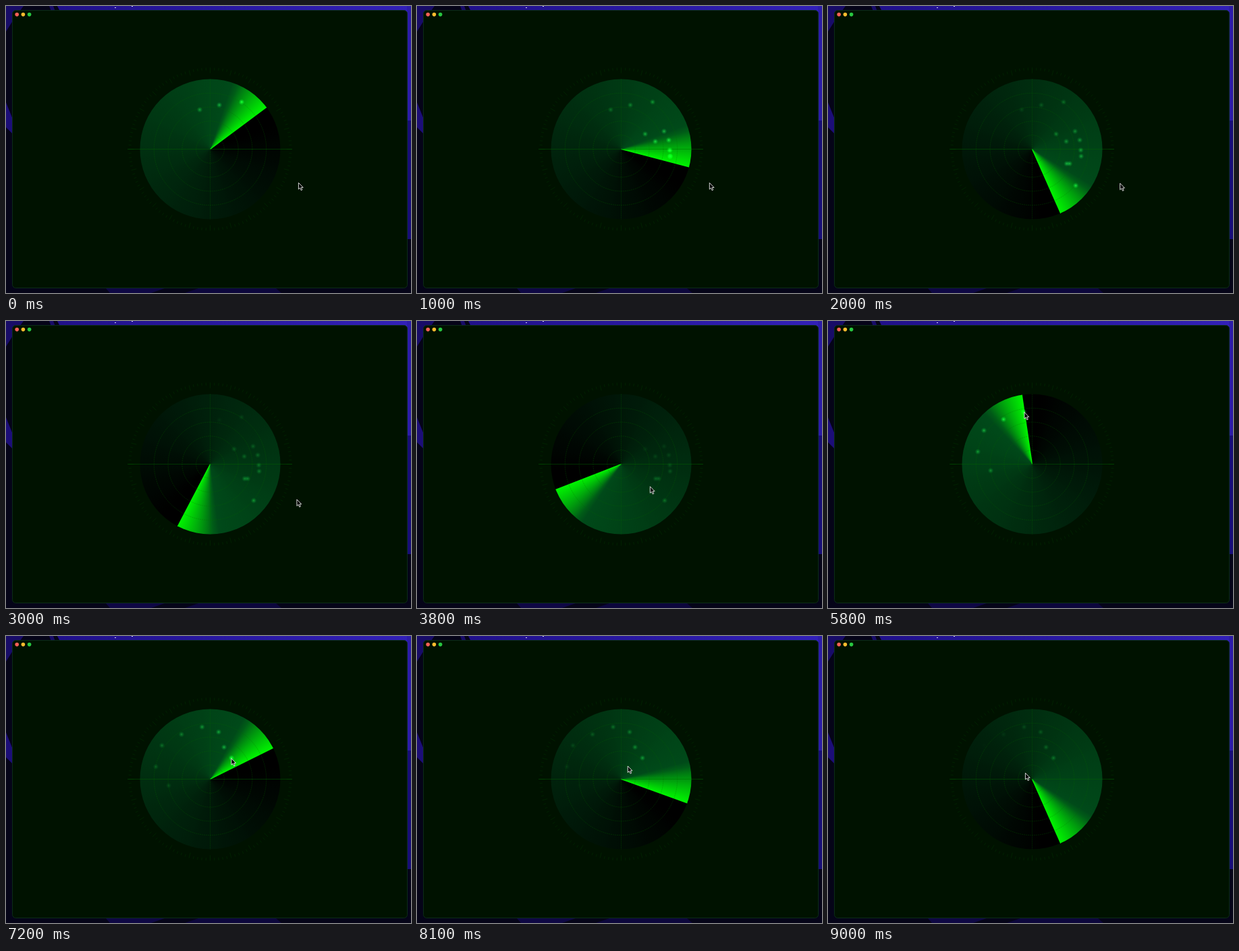
Animation, 600 px wide and 426 px high, one loop 9100 ms. Source, as an HTML page with a canvas:

```html
<!DOCTYPE html>
<html lang="en">
<head>
<meta charset="utf-8">
<title>Radar</title>
<style>
  html, body { margin: 0; width: 100%; height: 100%; overflow: hidden; background: #050414; }
  canvas { display: block; }
</style>
</head>
<body>
<canvas id="stage" width="600" height="426"></canvas>
<script>
const ctx = document.getElementById('stage').getContext('2d');
const LOOP = 9100, STEP = 100, TAU = Math.PI * 2;
const CX = 302.5, CY = 212.5, R = 104;
const TURN = 7000, START = -36.7 / 360 * TAU;
const FADE = 4200;

// Echoes from the previous turn, echoes ahead of the beam, and those the pointer visits
const older = [[287, 154], [316, 147], [349, 142.5]];
const ahead = [[338, 190], [366, 186], [353, 201], [373, 199], [374.5, 214],
  [375, 223], [353.5, 234], [358, 234], [367, 266.5]];
const visited = [[241, 222], [222, 194], [231, 162.5], [260, 146], [290.5, 135],
  [315, 142.5], [323, 165], [334, 181]];

const beamAngle = t => START + t / TURN * TAU;

// Time of the first turn at which the beam crosses a point
function crossing([x, y]) {
  const turn = (Math.atan2(y - CY, x - CX) - START) / TAU;
  return (turn + 1) % 1 * TURN;
}

const echoes = [
  ...older.map(p => [crossing(p) - TURN, ...p]),
  ...[...ahead, ...visited].map(p => [crossing(p), ...p])
];

const pointerStops = [[0, 433, 262], [3000, 430.5, 264.5],
  ...visited.map(p => [crossing(p), ...p]), [8400, 292, 203], [LOOP, 292, 203]];

// The pointer lingers at each stop, then hurries to the next
function pointerAt(t) {
  const i = Math.max(1, pointerStops.findIndex(stop => stop[0] >= t));
  const [t0, x0, y0] = pointerStops[i - 1], [t1, x1, y1] = pointerStops[i];
  const p = ((t - t0) / (t1 - t0)) ** 3;
  return [x0 + (x1 - x0) * p, y0 + (y1 - y0) * p];
}

function shape(color, ...points) {
  ctx.fillStyle = color;
  ctx.beginPath();
  points.forEach(([x, y]) => ctx.lineTo(x, y));
  ctx.closePath();
  ctx.fill();
}

function rect(color, x, y, w, h) {
  ctx.fillStyle = color;
  ctx.fillRect(x, y, w, h);
}

function circle(x, y, r) {
  ctx.beginPath();
  ctx.arc(x, y, r, 0, TAU);
}

function line(x1, y1, x2, y2) {
  ctx.beginPath();
  ctx.moveTo(x1, y1);
  ctx.lineTo(x2, y2);
  ctx.stroke();
}

function spoke(angle, from, to) {
  const c = Math.cos(angle), s = Math.sin(angle);
  line(CX + c * from, CY + s * from, CX + c * to, CY + s * to);
}

function drawDesktop() {
  rect('#050418', 0, 0, 600, 426);
  const top = ctx.createLinearGradient(76, 0, 600, 0);
  top.addColorStop(0, '#20108a');
  top.addColorStop(1, '#3220b8');
  shape(top, [76, 0], [600, 0], [600, 8], [80, 8]);
  shape('#180c68', [0, 0], [26, 0], [10, 22], [0, 38]);
  shape('#180c68', [64, 0], [70, 0], [73, 8], [67, 8]);
  shape('#1c0e78', [0, 143], [10, 168], [10, 190], [0, 180]);
  rect('#2c1ca8', 594, 0, 6, 170);
  rect('#180e78', 594, 170, 6, 176);
  shape('#0e0744', [148, 419], [235, 419], [215, 426], [154, 426]);
  shape('#0c063c', [285, 419], [400, 419], [408, 426], [265, 426]);
  rect('#d8d4ff', 161, 2, 2, 1);
  rect('#d8d4ff', 186, 0, 2, 1);
}

function drawWindow() {
  ctx.beginPath();
  ctx.roundRect(9.5, 6.5, 585, 412, 5);
  ctx.fillStyle = '#001200';
  ctx.fill();
  ctx.strokeStyle = '#0c2c18';
  ctx.lineWidth = 1;
  ctx.stroke();
  ['#ff5f57', '#febc2e', '#28c840'].forEach((color, i) => {
    circle(16.2 + i * 9.2, 12.6, 2.8);
    ctx.fillStyle = color;
    ctx.fill();
  });
}

// A bright wedge behind the beam melts into a tail that fades over the turn
function drawDisc(angle) {
  const cone = ctx.createConicGradient(angle, CX, CY);
  for (let deg = 0; deg <= 360; deg += 5) {
    const beam = Math.max(0, 1 - deg / 32) ** 0.8;
    const tail = Math.max(0, 1 - deg / 345);
    const green = 82 * tail + 160 * beam, blue = 28 * tail * (1 - beam);
    cone.addColorStop(1 - deg / 360, `rgb(0, ${green}, ${blue})`);
  }
  circle(CX, CY, R);
  ctx.fillStyle = cone;
  ctx.fill();
  ctx.strokeStyle = '#00f000';
  ctx.lineWidth = 1.2;
  spoke(angle, 0, R);
}

function drawGrid() {
  ctx.lineWidth = 1;
  ctx.strokeStyle = 'rgba(0, 110, 0, .3)';
  ctx.setLineDash([2, 1]);
  for (let i = 1; i < 5; i++) {
    circle(CX, CY, R * i / 5);
    ctx.stroke();
  }
  line(CX, CY - R, CX, CY + R);
  ctx.setLineDash([]);
  ctx.strokeStyle = 'rgba(0, 100, 0, .45)';
  line(180, 212.5, 424, 212.5);
  ctx.strokeStyle = 'rgba(0, 90, 0, .22)';
  for (let i = 0; i < 120; i++) spoke(i / 120 * TAU, i % 5 ? 117 : 113, 121);
}

function drawEchoes(t) {
  ctx.globalCompositeOperation = 'lighter';
  for (const [born, x, y] of echoes) {
    const age = t - born;
    if (age < 0 || age > FADE) continue;
    const glow = ctx.createRadialGradient(x, y, 0, x, y, 4.5);
    glow.addColorStop(0, 'rgba(40, 170, 60, .8)');
    glow.addColorStop(0.4, 'rgba(20, 135, 45, .5)');
    glow.addColorStop(1, 'rgba(0, 100, 30, 0)');
    ctx.globalAlpha = 1 - age / FADE;
    circle(x, y, 4.5);
    ctx.fillStyle = glow;
    ctx.fill();
  }
  ctx.globalAlpha = 1;
  ctx.globalCompositeOperation = 'source-over';
}

function drawPointer([x, y]) {
  ctx.save();
  ctx.translate(x + 0.4, y + 0.4);
  shape('#000', [0, 0], [0, 9.6], [2.2, 7.6], [3.8, 11.2], [5.4, 10.5], [3.9, 7], [6.8, 7]);
  ctx.strokeStyle = '#eee';
  ctx.lineWidth = 0.9;
  ctx.stroke();
  ctx.restore();
}

function frame(now) {
  const t = Math.floor(now % LOOP / STEP) * STEP;
  drawDesktop();
  drawWindow();
  drawDisc(beamAngle(t));
  drawGrid();
  drawEchoes(t);
  drawPointer(pointerAt(t));
  requestAnimationFrame(frame);
}

frame(0);
</script>
</body>
</html>
```
